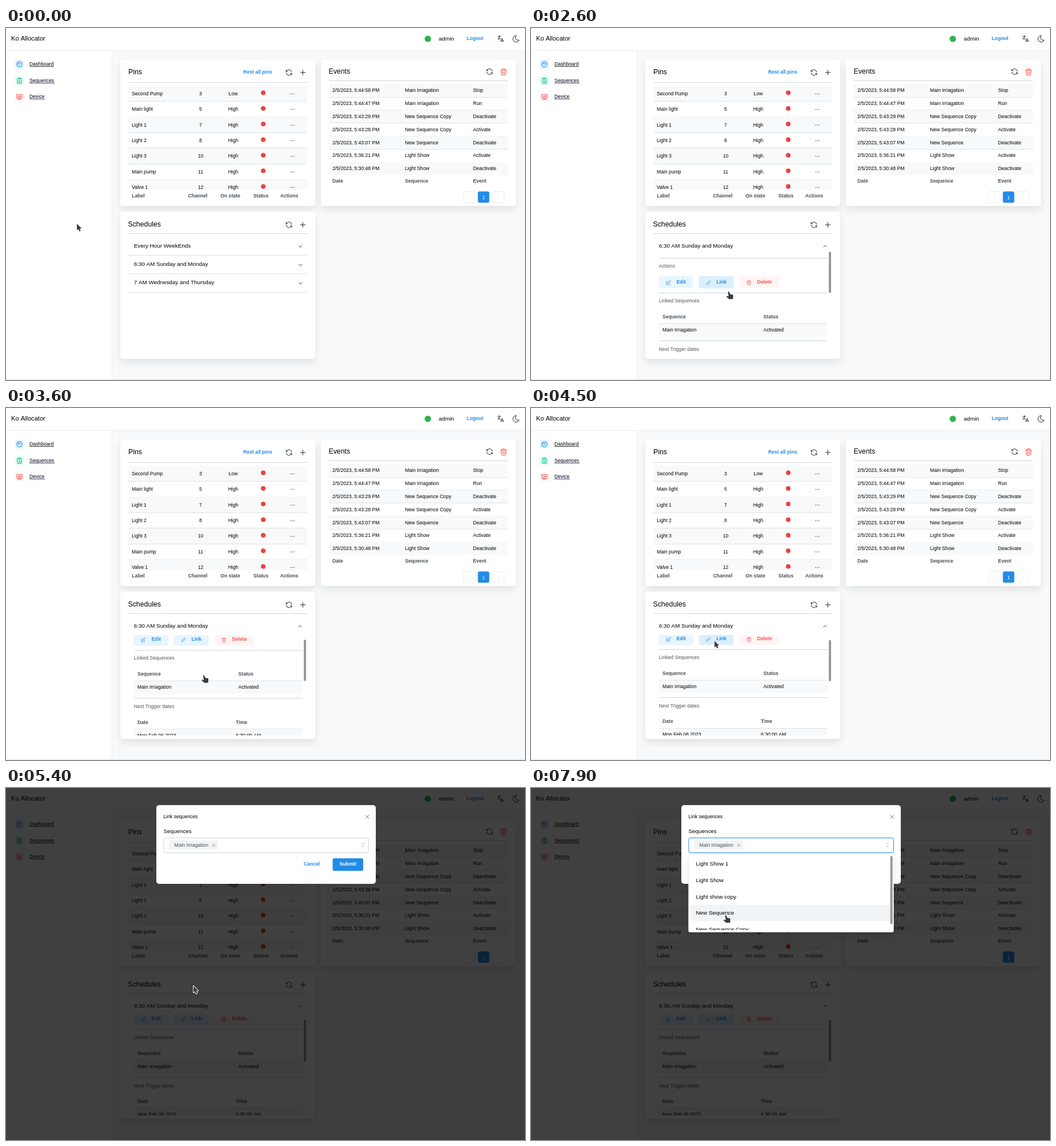
An HTML page with a canvas for the animation above (8 s loop, 908x617 px).

```html
<!DOCTYPE html>
<html lang="en">
<head>
<meta charset="utf-8">
<title>Scheduler dashboard</title>
<style>
html, body { margin: 0; width: 100%; height: 100%; overflow: hidden; background: #fff; }
canvas { display: block; }
</style>
</head>
<body>
<canvas id="stage" width="908" height="617"></canvas>
<script>
const stage = document.getElementById('stage').getContext('2d');
const layer = new OffscreenCanvas(908, 617).getContext('2d');
let ctx = stage;
const LOOP = 8000, STEP = 100;
const SMALL = 8.63, BODY = 9.86, TITLE = 12.32;
const INK = '#000', GRAY = '#495057', BLUE = '#228be6', RED = '#f03e3e', STRIPE = '#f8f9fa';

// Icons on a 24 unit grid
const ICONS = {
  refresh: 'M20 11a8.1 8.1 0 0 0-15.5-2m-.5-4v4h4M4 13a8.1 8.1 0 0 0 15.5 2m.5 4v-4h-4',
  plus: 'M12 5v14M5 12h14',
  trash: 'M4 7h16M10 11v6M14 11v6M5 7l1 12a2 2 0 0 0 2 2h8a2 2 0 0 0 2-2l1-12M9 7v-3a1 1 0 0 1 1-1h4a1 1 0 0 1 1 1v3',
  down: 'M6 9l6 6l6-6',
  left: 'M15 6l-6 6l6 6',
  right: 'M9 6l6 6l-6 6',
  cross: 'M18 6L6 18M6 6l12 12',
  selector: 'M8 9l4-4l4 4M16 15l-4 4l-4-4',
  edit: 'M9 7h-3a2 2 0 0 0-2 2v9a2 2 0 0 0 2 2h9a2 2 0 0 0 2-2v-3M9 15h3l8.5-8.5a1.5 1.5 0 0 0-3-3l-8.5 8.5v3',
  link: 'M10 14a3.5 3.5 0 0 0 5 0l4-4a3.5 3.5 0 0 0-5-5l-.5.5M14 10a3.5 3.5 0 0 0-5 0l-4 4a3.5 3.5 0 0 0 5 5l.5-.5',
  moon: 'M12 3h.4a7.5 7.5 0 0 0 7.9 12.4a9 9 0 1 1-8.3-12.4z',
  language: 'M4 5h7M9 3v2c0 4.4-2.2 8-5 8M5 9c0 2.1 3 3.9 6.7 4M12 20l4-9l4 9M19 18h-6',
  gauge: 'M21 12a9 9 0 1 1-18 0a9 9 0 1 1 18 0M12 13l4-5M7 12a5 5 0 0 1 5-5M11 13h2',
  clipboard: 'M9 5h-2a2 2 0 0 0-2 2v12a2 2 0 0 0 2 2h10a2 2 0 0 0 2-2v-12a2 2 0 0 0-2-2h-2M9 3h6v4h-6zM9 12h6M9 16h6',
  screen: 'M3 4h18v12h-18zM7 20h10M9 16v4M15 16v4M7 10h3l1 2l2-4l1 2h3'
};
for (const name in ICONS) ICONS[name] = new Path2D(ICONS[name]);

const POINTERS = {
  arrow: new Path2D('M0 0V11.6L2.6 9.5L4.4 13.4L6.6 12.4L4.9 8.7L8.2 8.3Z'),
  hand: new Path2D('M-1.6 1Q-.6-.6.8.6L2.2 4.6L6.4 5.2Q8 5.6 7.8 8L7.2 13.3H.8L-3.8 9.6Q-4.2 8 -2.6 7.8L-.2 8.4Z')
};

const pins = [['Second Pump', 3, 'Low'], ['Main light', 5, 'High'], ['Light 1', 7, 'High'], ['Light 2', 8, 'High'],
  ['Light 3', 10, 'High'], ['Main pump', 11, 'High'], ['Valve 1', 12, 'High']];
const events = [['5:44:58', 'Main Irriagation', 'Stop'], ['5:44:47', 'Main Irriagation', 'Run'],
  ['5:43:29', 'New Sequence Copy', 'Deactivate'], ['5:43:28', 'New Sequence Copy', 'Activate'],
  ['5:43:07', 'New Sequence', 'Deactivate'], ['5:36:21', 'Light Show', 'Activate'], ['5:30:48', 'Light Show', 'Deactivate']];
const schedules = ['Every Hour WeekEnds', '6:30 AM Sunday and Monday', '7 AM Wednesday and Thursday'];
const options = ['Light Show 1', 'Light Show', 'Light show copy', 'New Sequence', 'New Sequence Copy'];

// Pointer path: time, x, y
const path = [[0, 124, 343], [99, 124, 343], [100, 179, 365], [399, 179, 365], [400, 275, 392], [500, 275, 392],
  [700, 276, 383], [1000, 276, 383], [1500, 302, 410], [2400, 302, 410], [2600, 346, 462], [2900, 346, 462],
  [3000, 347, 475], [3500, 347, 475], [3800, 345, 455], [4200, 321, 408], [5300, 321, 408], [5800, 356, 103],
  [6000, 356, 103], [6200, 353, 147], [6300, 353, 147], [6600, 357, 166], [7000, 352, 206], [7100, 352, 206],
  [7200, 340, 227], [7600, 340, 226], [7900, 341, 223], [LOOP, 341, 223]];

const clamp = v => Math.max(0, Math.min(1, v));
const progress = (t, from, to) => clamp((t - from) / (to - from));

function pointerAt(t) {
  const i = path.findIndex(k => k[0] > t);
  const [t0, x0, y0] = path[i - 1], [t1, x1, y1] = path[i];
  const k = (t - t0) / (t1 - t0);
  return [x0 + (x1 - x0) * k, y0 + (y1 - y0) * k];
}

function text(str, x, y, { size = SMALL, color = INK, bold = false, align = 'left' } = {}) {
  ctx.font = `${bold ? 'bold ' : ''}${size}px "Liberation Sans", Arial, sans-serif`;
  ctx.fillStyle = color;
  ctx.textAlign = align;
  ctx.fillText(str, x, y + size * 0.34);
}

function rect(x, y, w, h, fill, radius = 0, border) {
  ctx.beginPath();
  ctx.roundRect(x, y, w, h, radius);
  if (fill) { ctx.fillStyle = fill; ctx.fill(); }
  if (border) { ctx.strokeStyle = border; ctx.lineWidth = 1; ctx.stroke(); }
}

const rule = (x, y, w, color = '#dee2e6') => rect(x, y, w, 1, color);

function dot(x, y, r, color) {
  ctx.beginPath();
  ctx.arc(x, y, r, 0, Math.PI * 2);
  ctx.fillStyle = color;
  ctx.fill();
}

function icon(name, x, y, size = 14.8, color = '#222', turn = 0, weight = 1.6) {
  ctx.save();
  ctx.translate(x, y);
  ctx.rotate(turn);
  ctx.scale(size / 24, size / 24);
  ctx.translate(-12, -12);
  ctx.strokeStyle = color;
  ctx.lineWidth = weight;
  ctx.lineCap = ctx.lineJoin = 'round';
  ctx.stroke(ICONS[name]);
  ctx.restore();
}

function clipped(x, y, w, h, draw) {
  ctx.save();
  ctx.beginPath();
  ctx.rect(x, y, w, h);
  ctx.clip();
  draw();
  ctx.restore();
}

function raised(x, y, w, h, radius) {
  ctx.save();
  ctx.shadowColor = 'rgba(0,0,0,0.09)';
  ctx.shadowBlur = 14;
  ctx.shadowOffsetY = 7;
  rect(x, y, w, h, '#fff', radius);
  ctx.restore();
}

// Draws as one group, so that overlapping parts fade together
function faded(alpha, draw) {
  layer.clearRect(0, 0, 908, 617);
  ctx = layer;
  draw();
  ctx = stage;
  ctx.globalAlpha = alpha;
  ctx.drawImage(layer.canvas, 0, 0);
  ctx.globalAlpha = 1;
}

function drawFrame() {
  rect(0, 0, 908, 617, '#f8f9fa');
  rect(0, 0, 908, 39, '#fff');
  rect(0, 39, 185, 578, '#fff');
  rule(0, 39, 908, '#e9ecef');
  rect(185, 39, 1, 578, '#e9ecef');
  rule(0, 616, 908, '#e3e6e9');
  text('Ko Allocator', 9, 18.5, { size: 11.09 });
  dot(738, 19, 5.6, '#30b350');
  text('admin', 757, 18.5, { size: BODY });
  text('Logout', 806, 18.5, { bold: true, color: BLUE });
  icon('language', 865.5, 19);
  icon('moon', 892.5, 19);
  const nav = [['Dashboard', 'gauge', BLUE, '#e7f5ff', 43], ['Sequences', 'clipboard', '#12b886', '#e6fcf5', 44],
    ['Device', 'screen', '#fa5252', '#fff5f5', 27]];
  nav.forEach(([label, name, color, tint, width], i) => {
    const y = 63 + i * 28.7;
    rect(15.5, y - 7.5, 16, 16, tint, 3);
    icon(name, 23.5, y + 0.5, 12.5, color, 0, 2);
    text(label, 41, y);
    rule(41, Math.round(y + 4), width, i ? '#4a3b78' : '#333');
  });
}

function drawPins() {
  raised(200, 55, 341, 257, 5);
  text('Pins', 214, 77, { size: TITLE });
  text('Rest all pins', 415, 77.5, { bold: true, color: BLUE });
  icon('refresh', 495, 78);
  icon('plus', 519.3, 78);
  rule(214, 95, 313, '#ced4da');
  clipped(214, 101, 313, 183, () => pins.forEach(([label, channel, state], i) => {
    const y = 115 + i * 27.35;
    if (i % 2 === 0) rect(214, y - 13.5, 313, 27.3, STRIPE);
    rule(214, Math.round(y + 13.2), 313);
    text(label, 220, y);
    text(channel, 340.5, y, { align: 'center' });
    text(state, 397.5, y, { align: 'center' });
    dot(450, y - 1.4, 4, RED);
    for (const dx of [-3, 0, 3]) dot(501 + dx, y + 0.5, 0.75, '#444');
  }));
  [['Label', 231.5], ['Channel', 335.5], ['On state', 392.5], ['Status', 446], ['Actions', 495.5]]
    .forEach(([label, x]) => text(label, x, 294, { bold: true, color: GRAY, align: 'center' }));
}

function drawEvents() {
  raised(551, 55, 341, 257, 5);
  text('Events', 564.5, 75.5, { size: TITLE });
  icon('refresh', 846, 76.5);
  icon('trash', 870.5, 77, 14.8, RED);
  rule(565, 92, 313, '#ced4da');
  events.forEach(([time, sequence, action], i) => {
    const y = 109.2 + i * 22.85;
    if (i % 2 === 0) rect(565, y - 11.4, 313, 22.8, STRIPE);
    if (i < 6) rule(565, Math.round(y + 11.4), 313);
    text(`2/5/2023, ${time} PM`, 571, y);
    text(sequence, 698, y);
    text(action, 817, y);
  });
  [['Date', 571], ['Sequence', 698], ['Event', 817]]
    .forEach(([label, x]) => text(label, x, 268.5, { bold: true, color: GRAY }));
  rect(800.5, 286.5, 20, 19.5, '#fff', 3, '#e9ecef');
  rect(851.5, 286.5, 20, 19.5, '#fff', 3, '#e9ecef');
  rect(825.5, 286.5, 20, 19.7, BLUE, 3);
  icon('left', 810.5, 296.5, 9, '#ced4da');
  icon('right', 861, 296.5, 9, '#ced4da');
  text('1', 835.7, 296.8, { color: '#fff', align: 'center' });
}

function drawClosedList(t, hover) {
  schedules.forEach((label, i) => {
    const y = 381.4 + i * 32.3;
    if (i === hover) rect(214, y - 15.4, 313, 32.3, STRIPE);
    rule(214, Math.round(y + 16.6), 313);
    text(label, 223.7, y, { size: BODY });
    const turn = i === 1 ? progress(t, 1600, 1900) * Math.PI * 0.75 : 0;
    icon('down', 515, y + 1.8, 10.8, '#222', turn, 2);
  });
}

function button(x, w, y, label, name, color, fill) {
  rect(x, y - 10.8, w, 21.6, fill, 3);
  icon(name, x + 16.8, y + 0.8, 10.5, color);
  text(label, x + (w + 18.5) / 2, y - 0.3, { bold: true, color, align: 'center' });
}

function drawOpenItem(t) {
  const eased = progress(t, 3100, 3700);
  const scroll = 41 * eased * (2 - eased);
  const linkHover = t >= 2500 && t < 3300 || t >= 4000;
  text(schedules[1], 223.7, 381.4, { size: BODY });
  icon('down', 514.5, 382.5, 10.8, '#222', Math.PI, 2);
  rect(521, 392 + scroll * 0.354, 4, 72.5, '#999', 2);
  clipped(214, 398, 306, 176, () => {
    ctx.translate(0, -scroll);
    const heading = { color: '#555' }, head = { bold: true, color: GRAY };
    for (const y of [403, 464, 548]) rule(223.5, y, 294.5, '#ced4da');
    text('Actions', 223.7, 417.3, heading);
    button(223.5, 60, 445.7, 'Edit', 'edit', BLUE, '#e7f5ff');
    button(293.5, 61, 445.7, 'Link', 'link', BLUE, linkHover ? '#dbeffe' : '#e7f5ff');
    button(364.5, 69.5, 445.7, 'Delete', 'trash', '#fa5252', '#fff5f5');
    text('Linked Sequences', 223.7, 478.3, heading);
    text('Sequence', 230, 506, head);
    text('Status', 406.5, 506, head);
    rect(223.5, 518, 294.5, 23, STRIPE);
    rule(223.5, 517.5, 294.5);
    text('Main Irriagation', 230, 529);
    text('Activated', 406.5, 529);
    text('Next Trigger dates', 223.7, 562.8, heading);
    text('Date', 230, 590.5, head);
    text('Time', 402, 590.5, head);
    rect(223.5, 603, 294.5, 23, STRIPE);
    rule(223.5, 602, 294.5);
    text('Mon Feb 06 2023', 230, 613.5);
    text('6:30:00 AM', 402, 613.5);
  });
}

function drawSchedules(t, [x, y]) {
  raised(200, 322, 341, 258, 5);
  text('Schedules', 213.5, 343.5, { size: TITLE });
  icon('refresh', 495, 345);
  icon('plus', 519.3, 345);
  rule(214, 360, 313, '#ced4da');
  if (t < 1800) drawClosedList(t, x > 214 ? Math.floor((y - 366) / 32.3) : -1);
  else drawOpenItem(t);
}

function drawDialog(p, focused) {
  const scale = 0.9 + 0.1 * p;
  ctx.save();
  ctx.translate(455, 99 + 6.2 * (1 - p));
  ctx.scale(scale, scale);
  ctx.translate(-455, -99);
  rect(263, 30, 384, 138, '#fff', 5);
  text('Link sequences', 275.5, 50);
  icon('cross', 632, 50.5, 12, '#555');
  text('Sequences', 275.5, 76, { size: BODY });
  rect(276, 87.5, 358.5, 26, '#fff', 3, focused ? BLUE : '#ced4da');
  rect(285, 92, 86, 16, '#f1f3f5', 3);
  text('Main Irriagation', 294.5, 99.8, { color: GRAY });
  icon('cross', 363.5, 100.5, 9, '#555');
  icon('selector', 624, 100, 11.5, '#868e96');
  text('Cancel', 535, 133, { bold: true, color: BLUE, align: 'center' });
  rect(571.5, 123.3, 53.5, 22, BLUE, 3);
  text('Submit', 598.2, 133, { bold: true, color: '#fff', align: 'center' });
  ctx.restore();
}

function drawModal(t) {
  const p = progress(t, 4500, 4666);
  if (!p) return;
  rect(0, 0, 908, 617, `rgba(0,0,0,${0.75 * progress(t, 4500, 4610)})`);
  faded(p ** 1.2, () => drawDialog(p, t >= 5900));
}

function drawDropdown(t, y) {
  if (t < 5900) return;
  const pitch = 28.6;
  const active = Math.max(0, Math.floor((y - 119) / pitch));
  raised(275.5, 116, 359, 137, 3);
  rect(276, 116.5, 358, 136, null, 3, '#e9ecef');
  clipped(276, 119, 358, 130, () => options.forEach((label, i) => {
    if (i === active) rect(279.5, 119 + i * pitch, 348.5, pitch - 0.3, '#f1f3f5', 2);
    text(label, 288.5, 133 + i * pitch, { size: BODY });
  }));
  rect(628.5, 119, 4, 119.5, '#999', 2);
}

function drawPointer(t, [x, y]) {
  const isArrow = t < 400 || t >= 2200 && t < 2500 || t >= 4300 && t < 5700;
  const shape = POINTERS[isArrow ? 'arrow' : 'hand'];
  ctx.save();
  ctx.translate(x, y);
  ctx.lineJoin = 'round';
  ctx.lineWidth = 1.8;
  ctx.strokeStyle = '#fff';
  ctx.stroke(shape);
  ctx.fillStyle = '#3d3d3d';
  ctx.fill(shape);
  ctx.restore();
}

function render(now) {
  const t = Math.floor((now % LOOP) / STEP) * STEP;
  const pointer = pointerAt(t);
  drawFrame();
  drawPins();
  drawEvents();
  drawSchedules(t, pointer);
  drawModal(t);
  drawDropdown(t, pointer[1]);
  drawPointer(t, pointer);
}

const start = performance.now();
function tick() {
  render(performance.now() - start);
  requestAnimationFrame(tick);
}
tick();
</script>
</body>
</html>
```
